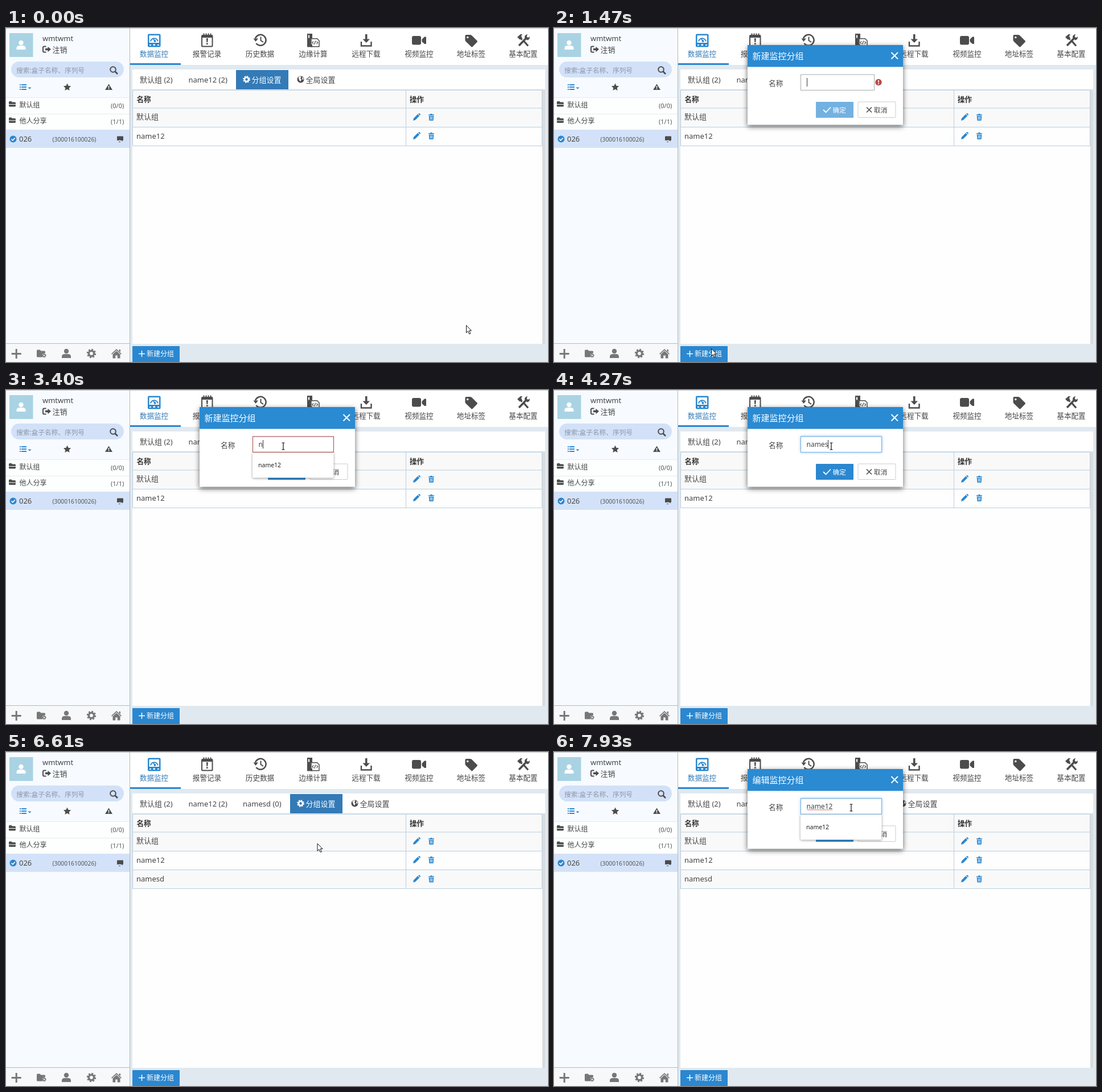
An HTML page for the animation above (8 s loop, 952 by 588 pixels).

```html
<!DOCTYPE html>
<html lang="zh-CN">
<head>
<meta charset="utf-8">
<title>监控分组</title>
<style>
html, body { margin: 0; width: 100%; height: 100%; overflow: hidden; background: #e1e9f0; }
svg { display: block; width: 952px; height: 588px; }
text { font: 13px "Noto Sans", "Noto Sans CJK SC", "Noto Sans CJK", sans-serif; fill: #444; white-space: pre; }
.line { fill: none; stroke: currentColor; }
.ico { color: #4c4c4c; fill: currentColor; }
.blue { color: #2a87d0; fill: currentColor; }
.grey { color: #777; fill: currentColor; }
.nav text { font-size: 12.6px; text-anchor: middle; }
.grid { stroke: #b9cee0; fill: none; }
.head { font-weight: 700; font-size: 12.6px; fill: #333; }
.small { font-size: 11px; fill: #555; }
.s12 { font-size: 12px; }
.white { fill: #fff; }
.field { fill: #fff; stroke: #a5c0da; }
.error { stroke: #a94442; }
.glow { stroke: #74b0e4; filter: drop-shadow(0 0 2.5px rgba(102, 175, 233, .7)); }
.panel { filter: drop-shadow(0 3px 5px rgba(0, 0, 0, .6)); }
.menu { fill: #fff; filter: drop-shadow(0 1px 2px rgba(0, 0, 0, .4)); }
</style>
</head>
<body>
<svg viewBox="0 0 952 588">
  <defs>
    <g id="gear" class="line"><circle r="4.6" stroke-width="3.4"/><circle r="6.9" stroke-width="2.6" stroke-dasharray="2.9 2.52"/></g>
    <g id="person"><circle cy="-4" r="4.2"/><path d="M-8 8V5.500Q-8 1-3 1H3Q8 1 8 5.500V8Z"/></g>
    <g id="folder"><path d="M-6-3.500q0-1.500 1.500-1.500h3l1.500 1.500h4.500q1.500 0 1.500 1.500V0H-6ZM-6 1H6V3q0 1.500-1.500 1.500h-9Q-6 4.500-6 3Z"/></g>
    <g id="bang"><circle r="5.700"/><path d="M-1-3.600H1L.6 .7H-.6ZM-.9 1.700H.9V3.400H-.9Z" fill="#fff"/></g>
    <g id="tools" class="blue">
      <path d="M-6 6l1-4L2.200-5.200 5.200-2.200-2 5ZM3-6l1-.8q.7-.5 1.300 0L6.700-5.400q.6.600 0 1.300L6-3Z"/>
      <path d="M21-4.700h3.200v-1.300h3.600v1.300H31v1.500H21ZM21.700-2.300H30.300L29.600 6H22.400Z"/>
      <path d="M24.300-1V4.500M26-1V4.500M27.700-1V4.500" stroke="#fff" stroke-width=".8"/>
    </g>
  </defs>

  <!-- sidebar -->
  <path fill="#f7fbff" d="M0 0H217V588H0Z"/>
  <path fill="#a9d3e3" d="M6 9H47.500V51H6Z"/>
  <use href="#person" x="26.500" y="30" class="white"/>
  <text x="64" y="22.500">wmtwmt</text>
  <g class="ico">
    <path class="line" stroke-width="2" d="M70.500 32.500H67q-2 0-2 2v6q0 2 2 2h3.500"/>
    <path d="M69 35.800h4.500V32.700L79 37.500l-5.500 4.800V39.200H69Z"/>
  </g>
  <text x="81.500" y="43.300">注销</text>
  <rect x="9" y="59" width="198" height="28" rx="14" fill="#d2e1f8"/>
  <text x="18" y="78.500" style="font-size:11.700px;fill:#8c97a6">搜索:盒子名称、序列号</text>
  <g class="ico line" stroke-width="2"><circle cx="188" cy="73" r="4.800" fill="none"/><path stroke-width="2.600" d="M191.500 76.500l4.500 4.500"/></g>
  <g class="blue">
    <path d="M24 99h2v2h-2ZM27 99h9v2h-9ZM24 103h2v2h-2ZM27 103h9v2h-9ZM24 107h2v2h-2ZM27 107h9v2h-9ZM38.500 104.500h6l-3 3Z"/>
  </g>
  <g class="ico">
    <path d="M107.500 97.500l2 4.200 4.600.6-3.400 3.200.9 4.500-4.100-2.200-4.100 2.200.9-4.500-3.400-3.200 4.600-.6Z"/>
    <path d="M180.500 98.500l6.500 10.500H174Z"/><path class="white" d="M179.700 102h1.600v3.500h-1.600ZM179.700 106.300h1.600v1.400h-1.600Z"/>
  </g>
  <path fill="#fdfefe" d="M0 122.500H217V179H0Z"/>
  <path stroke="#e6eaee" d="M0 122.500H217M0 151.500H217"/>
  <path fill="#d3e2f8" d="M0 179H217V211H0Z"/>
  <use href="#folder" x="11" y="134" class="ico"/><use href="#folder" x="11" y="162.500" class="ico"/>
  <text class="s12" x="23.500" y="140">默认组</text><text class="small" x="184" y="140.500">(0/0)</text>
  <text class="s12" x="23.500" y="168.300">他人分享</text><text class="small" x="184" y="169">(1/1)</text>
  <circle cx="12.500" cy="195.500" r="6" fill="#2a87d0"/><path d="M9.500 195.500l2.300 2.300 4-4.300" fill="none" stroke="#fff" stroke-width="1.700"/>
  <text x="23" y="200">026</text><text class="small" style="font-size:10.300px" x="81.500" y="199.500">(300016100026)</text>
  <path class="ico line" fill="none" d="M195.500 197.500v-6.500h10v6.500h-4M195.500 197.500h3M198 200.500h3M201 194.500l3.500 5"/>
  <path fill="#f6f8fa" d="M0 556H217V588H0Z"/><path stroke="#b5b9bd" d="M0 555.500H217M217.500 0V588"/>
  <g class="grey">
    <path d="M16.700 565h3v7h7v3h-7v7h-3v-7h-7v-3h7Z"/>
    <path d="M54 568q0-1.500 1.500-1.500h4l2 2h6q1.500 0 1.500 1.500v2l-5 2v5.500H55.500q-1.500 0-1.500-1.500Z"/>
    <use href="#gear" transform="translate(67 576.500) scale(.46)"/>
    <use href="#person" x="106" y="573"/><use href="#gear" x="150" y="573"/>
    <path d="M194 565l9 8.500-1 1.200-8-7.400-8 7.400-1-1.200ZM198.500 566h2.500v4.500l-2.500-2ZM187.500 574.500l6.500-6 6.500 6v7h-4.700v-5h-3.600v5h-4.700Z"/>
  </g>

  <!-- top navigation -->
  <path fill="#fff" d="M218 0H952V65H218Z"/>
  <path fill="#2a87d0" d="M218 62H307V65H218Z"/>
  <g class="blue">
    <rect x="249" y="10.500" width="22.500" height="23" rx="2"/><path class="white" d="M251.500 13H269V26H251.500Z"/>
    <path class="line" stroke-width="2" d="M254 23.500a6.500 6.500 0 0 1 12.800 0"/><path class="line" stroke-width="1.700" d="M258 18.500l4 4.500"/><circle cx="261.500" cy="23" r="2"/>
    <path class="white" d="M252 29h3v2h-3ZM258.500 28.500h3.500v2.500h-3.500ZM266 29h3v2h-3Z"/>
  </g>
  <g class="ico">
    <rect x="343" y="12" width="20.500" height="21.500" rx="2"/><path class="white" d="M345 17H361.500V31.500H345Z"/>
    <path class="line" stroke-width="2" d="M347.500 9.500v5M351.500 9.500v5M355.500 9.500v5M359.500 9.500v5"/>
    <path d="M351.800 18h3l-.5 7h-2ZM351.900 26.500h2.800v2.600h-2.800Z"/>
    <path class="line" stroke-width="2.500" d="M438 18.500a9.500 9.500 0 1 1 1.500 8.500"/><path d="M434.500 18.500h8.500l-4.500 5.500Z"/>
    <path class="line" stroke-width="2" d="M447.500 15.500v6.500l4.500 3"/>
    <path d="M529 10h9v8h-2.500v11H538v4.500h-9Z"/><path class="white" d="M531 12.500h2v5h-2Z"/>
    <path class="line" stroke-width="1.500" d="M536 18.700h10.500l3.500 3.500v10.500H536Z"/>
    <path class="line" stroke-width="1.200" d="M540 23.500l-2 2.300 2 2.300M545.500 23.500l2 2.300-2 2.300M543.700 22.500l-2 6.500"/>
    <path d="M631 11h3.500v8.500h4.500l-6.200 6.500-6.300-6.500H631Z"/><path class="line" stroke-width="2.400" d="M624 24v7.500h17.500V24"/>
    <rect x="713" y="14" width="16" height="15.500" rx="3"/><path d="M730.500 20l4.500-4.500h3v12.500h-3l-4.500-4Z"/>
    <path d="M806.500 14q0-2 2-2h7.500l2 1 9.500 9.500q1 1 0 2.300l-8 8.200q-1.200 1-2.300 0l-9.800-9.500-.9-2.300Z"/><circle class="white" cx="810.800" cy="16.500" r="1.700"/>
    <path class="line" stroke-width="3.600" d="M901 31L914 17.500"/><path d="M911 17q-.5-5 5-6l-1.500 4 2.500 2.200 2.500-2.200q1.500 5-4 6.500Z"/>
    <path class="line" stroke-width="3.200" d="M909.500 23l7.500 8.500M903 17l3.500 3.500"/><path d="M898 16l6-5.200 3.500 1-3 2.200 2 2.500-4 4Z"/>
  </g>
  <g class="nav">
    <text x="260" y="49.800" style="fill:#337ab7">数据监控</text><text x="353" y="49.800">报警记录</text>
    <text x="446" y="49.800">历史数据</text><text x="539.500" y="49.800">边缘计算</text>
    <text x="632.500" y="49.800">远程下载</text><text x="725.500" y="49.800">视频监控</text>
    <text x="817" y="49.800">地址标签</text><text x="908.500" y="49.800">基本配置</text>
  </g>
  <path stroke="#c5c8ca" d="M0 .5H952"/>

  <!-- group tabs and table -->
  <path fill="#fff" d="M222 73H947V107.500H222Z"/>
  <path fill="#fefefe" d="M222 109H942V556H222Z"/><path fill="#d9dcdf" d="M942 109H947V556H942Z"/>
  <text x="235" y="95.700">默认组 (2)</text><text x="320.500" y="95.700">name12 (2)</text>
  <text x="416" y="95.700" data-on="5830-8000">namesd (0)</text>
  <g id="tabs">
    <path fill="#337ab7" d="M404 74H496V108H404Z"/>
    <use href="#gear" transform="translate(422.500 90.500) scale(.78)" color="#fff"/>
    <text class="white" x="431.500" y="95.700">分组设置</text>
    <circle cx="517.500" cy="90.500" r="6" class="ico"/><path class="white" d="M513.500 87l3-2.300 2 1.500-1.500 2.500 2 2-2 3.500-2-2.500ZM520 87l2.300.5v4l-1.800-1Z"/>
    <text x="526.500" y="95.700">全局设置</text>
  </g>
  <path fill="#f9f9f9" d="M222 109H942V174H222Z"/>
  <path class="grid" d="M222.500 109.500H941.500V207.500H222.500ZM222 141H942M222 174.500H942M702.500 109V207.500"/>
  <text class="head" x="229.500" y="130">名称</text><text class="head" x="709" y="130">操作</text>
  <text x="229" y="161.300">默认组</text><use href="#tools" x="721" y="157"/>
  <text x="229" y="194.700">name12</text><use href="#tools" x="721" y="190"/>
  <g data-on="5830-8000">
    <path fill="#f9f9f9" d="M222 208H942V241H222Z"/><path class="grid" d="M222.500 207.500V240.500H941.500V207.500M702.500 207.500V240.500"/>
    <text x="229" y="228">namesd</text><use href="#tools" x="721" y="223.500"/>
  </g>
  <rect x="709.500" y="181.500" width="22" height="19" fill="none" stroke="#6aa9e2" data-on="7000-7770"/>
  <rect x="222" y="560" width="83" height="28" rx="1" fill="#2a87d0"/>
  <rect x="222" y="560" width="83" height="28" rx="1" fill="#337ab7" data-on="1240-1470"/>
  <path class="line" color="#fff" stroke-width="1.500" d="M233 573.500h11M238.500 568v11"/>
  <text class="white s12" x="247" y="578.300">新建分组</text>

  <!-- dialog -->
  <g data-on="1470-5830,7070-8000">
    <path id="panel" class="panel" fill="#fff"/>
    <path fill="#2a8ad2" d="M340 30H613V68.500H340Z"/>
    <text class="white" style="font-size:15px" x="348.500" y="55" id="title"></text>
    <path stroke="#fff" stroke-width="2" d="M592.500 43l11.500 11.500M604 43l-11.500 11.500"/>
    <g data-on="7070-7230">
      <rect x="352.500" y="82" width="247.500" height="43.500" rx="3" fill="#f2dede" stroke="#ebccd1"/>
      <use href="#bang" x="372" y="102.500" fill="#a94442"/>
      <path stroke="#a94442" stroke-width="3" d="M576.500 97l8 8M584.500 97l-8 8"/>
    </g>
    <g id="form">
      <text x="377" y="102" style="font-size:12.700px">名称</text>
      <g data-on="1470-3400">
        <rect class="field" style="stroke:#aaa" x="433.500" y="82" width="129" height="27.500"/>
        <rect class="field error" x="433.500" y="82" width="129" height="27.500" data-on="1550-3400"/>
        <use href="#bang" x="570" y="95.500" fill="#b94a48"/>
      </g>
      <rect class="field" x="433.500" y="82" width="142" height="27.500" data-on="3400-8000"/>
      <rect class="field error" x="433.500" y="82" width="142" height="27.500" data-on="3400-3550"/>
      <rect class="field glow" x="433.500" y="82" width="142" height="27.500" data-on="3550-5700,7770-8000"/>
      <text id="value" class="s12" x="443.500" y="100"></text>
      <path id="caret" stroke="#333" d="M0 88V103" data-on="1470-1960,2160-2470,3020-5330"/>
      <path fill="none" stroke="#d9534f" data-on="7930-8000" d="M444 102.500l1.500-1.500 1.500 1.500 1.500-1.500 1.500 1.500 1.500-1.500 1.500 1.500 1.500-1.500 1.500 1.500 1.500-1.500 1.500 1.500 1.500-1.500 1.500 1.500 1.500-1.500 1.500 1.500 1.500-1.500 1.500 1.500 1.500-1.500 1.500 1.500 1.500-1.500 1.500 1.500 1.500-1.500 1.500 1.500 1.500-1.500 1.500 1.500 1.500-1.500 1.500 1.500 1.500-1.500 1.500 1.500 1.500-1.500 1.500 1.500"/>
      <rect x="460" y="130" width="66" height="28" rx="1" fill="#2a87d0"/>
      <rect x="460" y="130" width="66" height="28" rx="1" fill="#73b1e1" data-on="1470-3400"/>
      <rect x="459.500" y="129.500" width="67" height="29" rx="1" fill="#337ab7" data-on="5370-5830"/>
      <rect x="460" y="130" width="66" height="28" rx="1" fill="none" stroke="#2367b5" data-on="5700-5830"/>
      <path fill="none" stroke="#fff" stroke-width="1.800" d="M473 144l4.500 4.500 8.500-9"/>
      <text class="white" style="font-size:11.700px" x="489.500" y="148.500">确定</text>
      <rect x="534" y="130" width="66" height="27.500" rx="1" fill="#fff" stroke="#ccc"/>
      <path stroke="#444" stroke-width="1.500" d="M549 139.500l9 9M558 139.500l-9 9"/>
      <text style="font-size:11.700px" x="562" y="148.500">取消</text>
    </g>
    <rect class="menu" x="433" y="110" width="130" height="44.500" rx="2" data-on="2310-3400"/>
    <rect class="menu" x="433" y="110" width="142.500" height="44.500" rx="2" data-on="3400-4270,7930-8000"/>
    <text style="font-size:10.500px;fill:#222" x="443" y="136.300" data-on="2310-4270,7930-8000">name12</text>
  </g>

  <g id="pointer">
    <path data-on="0-1240,1470-2080,4960-5370,5830-6850,7070-7690" fill="#fff" stroke="#111" d="M.5.500V13.500L3.500 10.700 5.800 15.800 7.900 14.900 5.700 9.800H9.500Z"/>
    <path data-on="2080-4960,7690-8000" class="line" color="#111" stroke-width="1.200" d="M-2.500-6H-.8L0-5.300.8-6H2.500M0-5.500V5.500M-2.500 6H-.8L0 5.300.8 6H2.500"/>
    <path data-on="1240-1470,5370-5830,6850-7070" fill="#fff" stroke="#111" d="M-1.500 10V.700Q-1.500-.7 0-.7T1.500.7V6Q2.500 5 4 6.200 5.500 5.500 6.500 7 8.500 6.600 8.500 8.800V12.500L6.800 17.500H-.5L-4.500 11.500Q-5.300 9.500-4 9-2.600 8.800-1.500 10Z"/>
  </g>
</svg>
<script>
const LOOP = 8000;
const $ = id => document.getElementById(id);
const spans = [...document.querySelectorAll('[data-on]')].map(el => ({
  el, ranges: el.dataset.on.split(',').map(r => r.split('-').map(Number))
}));

// start, end, steps, target x, target y, optional bend x, y
const moves = [
  [70, 610, 8, 408, 430, 560, 336],
  [780, 1320, 8, 276, 564],
  [1550, 2160, 9, 487, 99],
  [4880, 5120, 4, 531, 152],
  [5290, 5580, 5, 503, 152],
  [6460, 6920, 7, 722.5, 196],
  [7230, 7770, 8, 522, 98]
];
const typing = [[0, ''], [3400, 'n'], [3470, 'na'], [3550, 'nam'], [3720, 'name'],
  [4270, 'names'], [4800, 'namesd'], [7070, 'name12']];

const ease = p => p * p * (3 - 2 * p);
const bezier = (a, b, c, p) => (1 - p) * (1 - p) * a + 2 * p * (1 - p) * b + p * p * c;

function pointerAt(t) {
  let x = 808, y = 523;
  for (const [start, end, steps, tx, ty, bx = (x + tx) / 2, by = (y + ty) / 2] of moves) {
    if (t < start) break;
    const step = 1 + Math.floor((t - start) / (end - start) * (steps - 1));
    const p = ease(Math.min(1, step / steps));
    x = bezier(x, bx, tx, p);
    y = bezier(y, by, ty, p);
  }
  return `translate(${x.toFixed(1)} ${y.toFixed(1)})`;
}

function draw(t) {
  for (const { el, ranges } of spans)
    el.style.display = ranges.some(([a, b]) => t >= a && t < b) ? '' : 'none';

  const alert = t >= 7070 && t < 7230;
  $('panel').setAttribute('d', `M340 30H613V${alert ? 231.5 : 170.5}H340Z`);
  $('form').setAttribute('transform', `translate(0 ${alert ? 61 : 0})`);
  $('tabs').setAttribute('transform', `translate(${t >= 5830 ? 95 : 0})`);
  $('title').textContent = t < 7070 ? '新建监控分组' : '编辑监控分组';

  const value = $('value');
  value.textContent = typing.filter(([at]) => t >= at).pop()[1];
  const width = value.textContent ? value.getComputedTextLength() : 0;
  $('caret').setAttribute('transform', `translate(${Math.round(443.5 + width) + .5})`);
  $('pointer').setAttribute('transform', pointerAt(t));
}

const origin = performance.now();
function tick() {
  draw((performance.now() - origin) % LOOP);
  requestAnimationFrame(tick);
}
tick();
</script>
</body>
</html>
```
